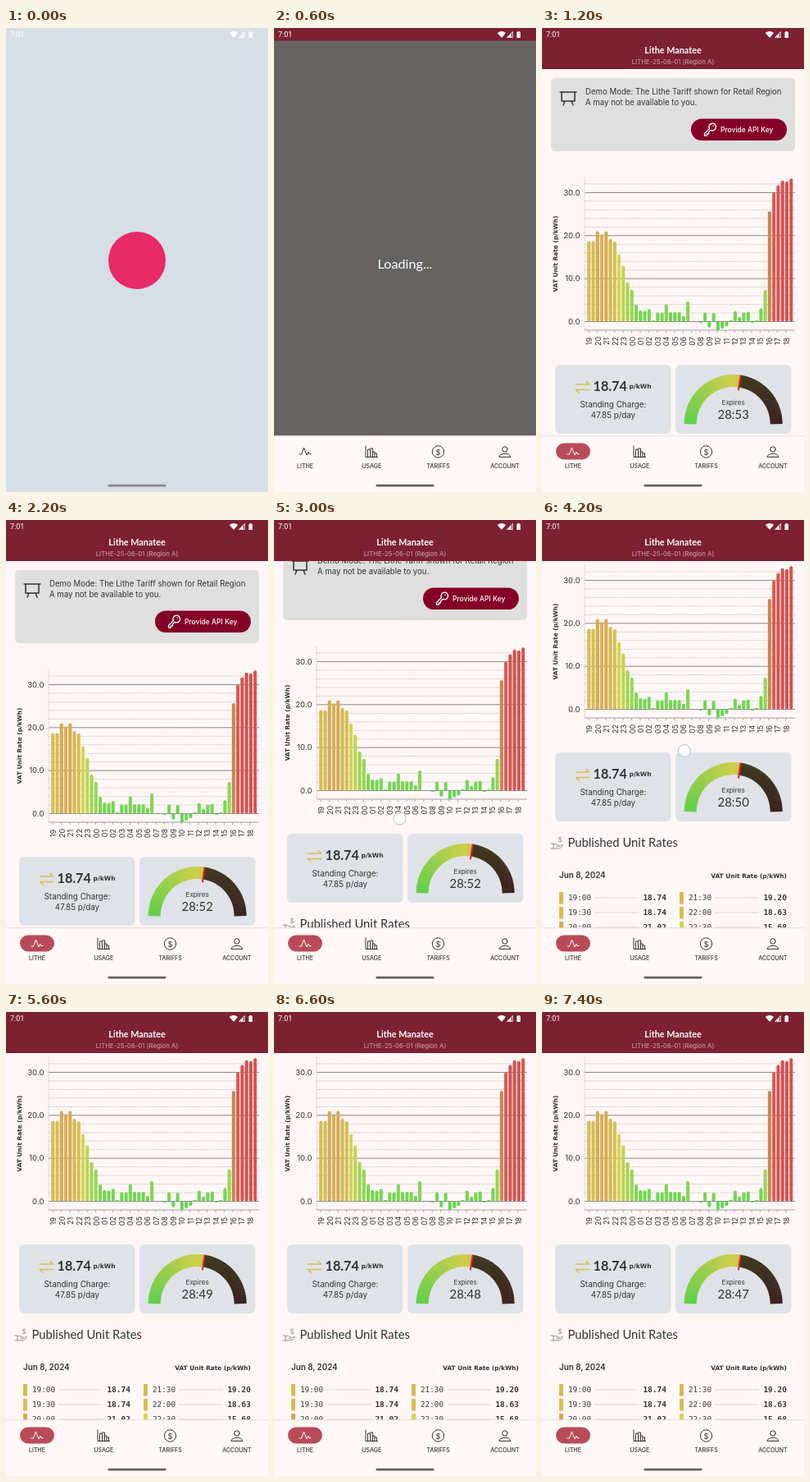
Recreate the animation shown at these times as an HTML page. Size 320 by 565 pixels, loop 8000 ms.

```html
<!DOCTYPE html>
<html lang="en">
<head>
<meta charset="utf-8">
<title>Tariff app</title>
<style>
  html, body { margin: 0; height: 100%; overflow: hidden; background: #fef7f6; }
  svg { display: block; width: 100vw; height: 100vh; }
  text { font-family: Inter, sans-serif; fill: #333; }
  .round { font-family: Lato, sans-serif; }
  .wide { font-family: "DejaVu Sans", sans-serif; font-weight: 700; }
  .mono { font-family: "DejaVu Sans Mono", monospace; }
  .line { fill: none; stroke: #333; stroke-width: 1; stroke-linecap: round; stroke-linejoin: round; }
</style>
</head>
<body>
<svg id="stage" viewBox="0 0 320 565"></svg>
<script>
const LOOP = 8000;
const MAROON = '#7c2131';
const rates = [
  18.74, 18.74, 21.02, 20.3, 21, 19.2, 18.63, 15.68, 13, 9.1, 7.4, 3.9,
  2.6, 2.5, 2.9, .3, 2.1, 2.1, 4, 2.2, 2.2, 2.2, 1.3, 4.7,
  0, 0, -.3, 2.1, -1.4, 2, -2.1, -1.6, -1.1, .3, 2.5, 1.1,
  2.1, 2.3, -.3, .2, 3.1, 7.4, 25.7, 30, 31.7, 32.8, 32.6, 33.3
];

const repeat = (n, draw) => Array.from({ length: n }, (_, i) => draw(i)).join('');
const text = (x, y, size, str, attrs = '') =>
  `<text x="${x}" y="${y}" font-size="${size}" ${attrs}>${str}</text>`;
const rect = (x, y, w, h, fill, r = 0) =>
  `<rect x="${x}" y="${y}" width="${w}" height="${h}" rx="${r}" fill="${fill}"/>`;
const line = (x1, y1, x2, y2, color, attrs = '') =>
  `<path d="M${x1} ${y1}L${x2} ${y2}" stroke="${color}" ${attrs}/>`;
const icon = (x, y, d, attrs = '') =>
  `<path class="line" transform="translate(${x} ${y})" d="${d}" ${attrs}/>`;

const MIDDLE = 'text-anchor="middle"', END = 'text-anchor="end"', BOLD = 'font-weight="700"';
const ZERO_Y = 357.5, UNIT = 5.235;
const rateY = v => ZERO_Y - v * UNIT;

// Green through yellow to red as the price rises
function rateColor(rate) {
  const v = Math.max(rate, 0);
  return `hsl(${Math.max(0, 112 - 3 * v - .02 * v * v)} 61% 58%)`;
}

function demoCard() {
  return rect(11, 61, 298, 89, '#e0dfdf', 5) +
    icon(32, 85, 'M-10-7H10M-8-7V4H8V-7M-4 4L-6 9M4 4L6 9', 'style="stroke-width:1.5"') +
    text(53, 81, 9.65, 'Demo Mode: The Lithe Tariff shown for Retail Region') +
    text(53, 94, 9.65, 'A may not be available to you.') +
    rect(182, 110.5, 117, 26.5, '#840026', 13.2) +
    icon(205.5, 123, 'M-1-.5L-7 5.5V8H-4V6H-2V4L.8 1.3A4.3 4.3 0 1 0-1-.5M3.5-3.8H3.8',
      'style="stroke:#fff;stroke-width:1.3"') +
    text(218, 127.2, 8.5, 'Provide API Key', 'font-weight="500" style="fill:#fff"');
}

function chart() {
  const grid = repeat(18, i => {
    const v = 2 * i - 2, major = v % 10 === 0;
    return line(52, rateY(v), 309, rateY(v), major ? '#8d8888' : '#cfc9c9',
      major ? '' : 'stroke-dasharray="2 1"');
  });
  const bars = rates.map((v, i) => {
    if (!v) return '';
    const h = Math.max(Math.abs(v) * UNIT, 1.5);
    return rect(55.2 + i * 5.255, v > 0 ? ZERO_Y - h : ZERO_Y, 4.1, h, rateColor(v), Math.min(2, h / 2));
  }).join('');
  const hours = repeat(24, i => {
    const x = 58 + i * 10.46, hour = String((19 + i) % 24).padStart(2, '0');
    return line(x - .8, 368, x - .8, 371, '#aaa') +
      text(0, 0, 9, hour, `${MIDDLE} transform="translate(${x + 3.2} 381.5) rotate(-90)"`);
  });
  const scale = [30, 20, 10, 0].map(v => text(46.5, rateY(v) + 3.3, 9.6, v.toFixed(1), END)).join('');
  return grid + line(52, 182, 52, 368, '#cfc9c9', 'stroke-dasharray="2 1"') +
    line(52, 368, 309, 368, '#b5aeae') + bars + hours + scale +
    text(0, 0, 7.4, 'VAT Unit Rate (p/kWh)', `class="wide" ${MIDDLE} transform="translate(19 275) rotate(-90)"`);
}

function summaryCards() {
  const gauge = repeat(60, i => {
    const passed = i / 60 < .548, hue = 110 - i * 1.7;
    return `<rect x="-60" y="-1.65" width="15" height="3.3" transform="rotate(${i * 3 + 1.5})"
      fill="hsl(${Math.max(hue, 0)} ${passed ? '58% 55%' : '32% 18%'})"/>`;
  });
  return rect(16, 410, 141.5, 84, '#dfe3e8', 6) + rect(163, 410, 141.5, 84, '#dfe3e8', 6) +
    icon(49.5, 437, 'M-8-3H8L4.5-6.5M8 3.5H-8L-4.5 7', 'style="stroke:#d8bd4c;stroke-width:1.6"') +
    text(62.5, 442, 16.2, '18.74', `class="round" ${BOLD}`) +
    text(106.5, 439, 7.6, 'p/kWh', 'class="wide"') +
    text(87, 462, 9.9, 'Standing Charge:', MIDDLE) +
    text(87, 475, 9.8, '47.85 p/day', MIDDLE) +
    `<g transform="translate(233.7 482)">${gauge}
      <path d="M-1-60H1V-41H-1Z" fill="#e3202c" transform="rotate(8.7)"/></g>` +
    text(233.7, 459, 8.2, 'Expires', MIDDLE) +
    text(233.7, 476.3, 14.9, '', `id="timer" class="round" ${MIDDLE}`);
}

function rateTable() {
  const entry = (x, y, time, value) => rect(x, y, 5, 14.5, rateColor(+value)) +
    text(x + 11, y + 10.3, 9.3, time, 'class="mono"') +
    line(x + 44, y + 7, x + 97, y + 7, '#c5bdbd', 'stroke-dasharray="1.5 1"') +
    text(x + 131, y + 10.3, 9.5, value, `class="mono" ${BOLD} ${END}`);
  const left = [['19:00', '18.74'], ['19:30', '18.74'], ['20:00', '21.02']];
  const right = [['21:30', '19.20'], ['22:00', '18.63'], ['22:30', '15.68']];
  return icon(18, 521, 'M-7 0H-4V6H-7M-4 1C-1-1 0 2 3 2C4 4 1 4 0 3.5M4 3L7 1C8 3 5 6 2 6H-4',
      'style="stroke:#888;stroke-width:.9"') +
    text(22, 519, 8, '$', `${MIDDLE} style="fill:#888"`) +
    text(31.5, 525, 14.8, 'Published Unit Rates', 'class="round"') +
    text(21, 562.5, 9.8, 'Jun 8, 2024', 'font-weight="600"') +
    text(299, 563, 7.4, 'VAT Unit Rate (p/kWh)', `class="wide" ${END}`) +
    repeat(3, i => entry(21, 580 + i * 18, ...left[i]) + entry(168, 580 + i * 18, ...right[i]));
}

function navBar() {
  const labels = ['LITHE', 'USAGE', 'TARIFFS', 'ACCOUNT'];
  return rect(0, 496.5, 320, 69, '#fef8f7') + line(0, 496.7, 320, 496.7, '#ddd6d6', 'stroke-width=".8"') +
    '<rect id="pill" x="17" y="505.5" width="42" height="20" rx="10" fill="#b94b59"/>' +
    icon(38, 516, 'M-7 3H-4.5L-1.5-5L2 4L4 0L5 2.5H7', 'id="pulse"') +
    icon(119, 516, 'M-7-7V6.5H7.5M-4.5 6V-3H-1.5V6M-1.5-4H1.5V6M1.5 0H4V6M4 2H6.5V6') +
    icon(200.5, 516, 'M7.2 0A7.2 7.2 0 1 1-7.2 0A7.2 7.2 0 1 1 7.2 0') +
    text(200.5, 519.5, 9.5, '$', MIDDLE) +
    icon(282, 516, 'M3.2-3A3.2 3.2 0 1 1-3.2-3A3.2 3.2 0 1 1 3.2-3M-7 6C-6 1 6 1 7 6Z') +
    labels.map((s, i) => text(38 + i * 81.3, 536, 7, s, `${MIDDLE} font-weight="500"`)).join('');
}

document.getElementById('stage').innerHTML = `
  <g id="app">
    ${rect(0, 0, 320, 565, '#fef7f6')}
    <g id="content">${demoCard() + chart() + summaryCards() + rateTable()}</g>
    <circle id="touch" r="7.5" fill="#fff" fill-opacity=".75" stroke="#b4c3d1"/>
    ${rect(0, 0, 320, 50, MAROON)}
    ${text(160, 31, 10.8, 'Lithe Manatee', `class="round" ${BOLD} ${MIDDLE} style="fill:#fff"`)}
    ${text(160, 44, 7.8, 'LITHE-25-06-01 (Region A)', `${MIDDLE} style="fill:#d3a3ab"`)}
  </g>
  <g id="loading">
    ${rect(0, 0, 320, 500, '#666462') + rect(0, 0, 320, 15.5, MAROON)}
    ${text(160, 293, 16.2, 'Loading...', `class="round" ${MIDDLE} style="fill:#fff"`)}
  </g>
  ${navBar()}
  <g id="splash">
    ${rect(0, 0, 320, 565, '#d7dfe6')}
    <circle cx="160" cy="283" r="35" fill="#e72a68"/>
  </g>
  ${text(5, 11, 9, '7:01', 'style="fill:#fff;font-family:Roboto,sans-serif"')}
  <path d="M272.8 6Q278 2 283.2 6L278 12ZM290 6V11H285.5ZM296.5 5H297.5V4H300V5H301V12H296.5Z" fill="#fff"/>
  <path d="M284.5 11.5H291.5V4.5Z" fill="none" stroke="#fff" stroke-width=".8"/>
  <rect id="home" x="124.5" y="555.8" width="71" height="2.8" rx="1.4"/>`;

const el = id => document.getElementById(id);
const show = (id, on) => { el(id).style.display = on ? '' : 'none'; };

function render(t) {
  const splash = t < 600, tabActive = t >= 800;
  show('splash', splash);
  show('loading', t < 1200);
  show('pill', tabActive);
  el('pulse').style.stroke = tabActive ? '#fff' : '#333';
  el('home').setAttribute('fill', t < 200 ? '#8a8688' : splash ? '#787477' : '#656060');

  const drag = Math.min(Math.max((t - 2800) / 1420, 0), 1);
  const scroll = 127 * Math.sin(drag * Math.PI / 2);
  el('content').setAttribute('transform', `translate(0 ${-scroll})`);
  show('touch', t >= 2800 && t < 4400);
  el('touch').setAttribute('cx', 147.5 + scroll * .208);
  el('touch').setAttribute('cy', 387 - scroll * .835);
  el('timer').textContent = '28:' + (55 - Math.floor((t + 800) / 1000));
}

const start = performance.now();
(function tick() {
  render((performance.now() - start) % LOOP);
  requestAnimationFrame(tick);
})();
</script>
</body>
</html>
```
